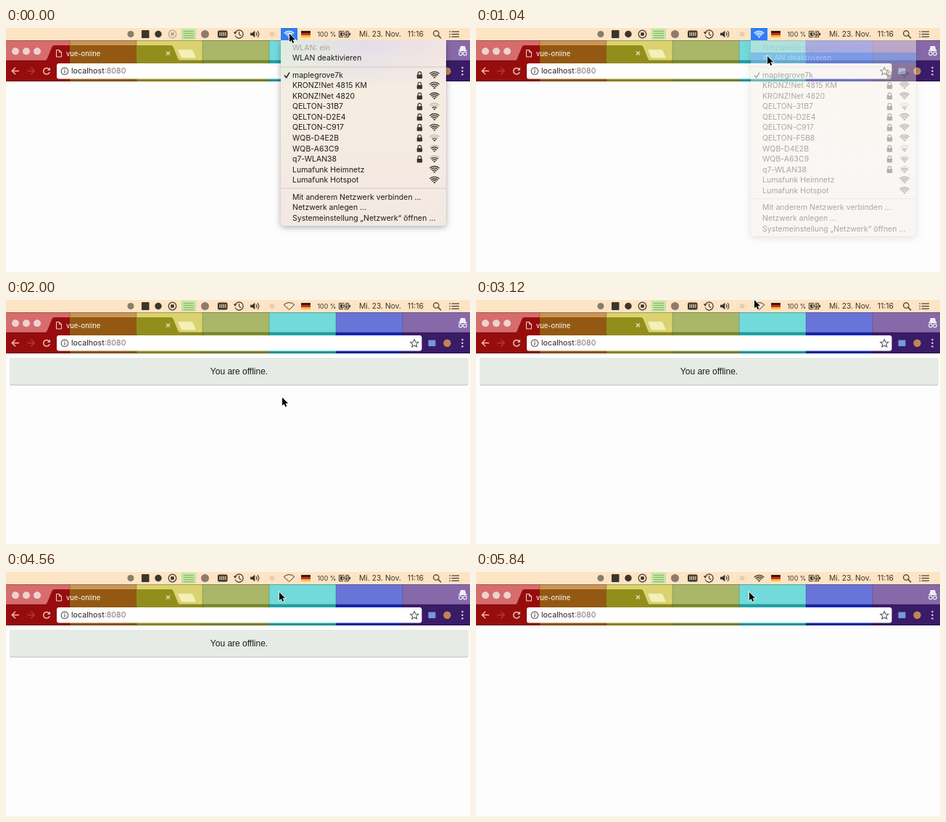
These frames come from a looping animation (640 by 338 pixels, 5.92 s). An HTML page with a canvas:

```html
<!DOCTYPE html>
<html lang="de">
<head>
<meta charset="utf-8">
<title>Online/offline demo</title>
<style>
html, body { margin: 0; width: 100%; height: 100%; overflow: hidden; background: #fdfdfd; }
canvas { display: block; width: 640px; height: 338px; }
</style>
</head>
<body>
<canvas id="stage"></canvas>
<script>
const LOOP = 5920, STEP = 80, W = 640, H = 338;
const canvas = document.getElementById('stage');
const c = canvas.getContext('2d');
const ratio = window.devicePixelRatio || 1;
canvas.width = W * ratio;
canvas.height = H * ratio;

const UI = 'Inter, sans-serif';
const INK = '#3d352d', BLUE = '#2f7df4';

// Stripe: left edge, tab strip colour, toolbar colour
const stripes = [
  [0, '#d66c6c', '#970d0d'], [88, '#c99457', '#935912'], [180, '#dbd270', '#938e1b'],
  [271, '#a8b768', '#7d8b2c'], [363, '#72dada', '#20a3a8'],
  [455, '#6974d9', '#1726ad'], [547, '#8769a9', '#3a1b67']
];

// Network: name, signal strength 1-3, locked
const networks = [
  ['maplegrove7k', 3, 1], ['KRONZ!Net 4815 KM', 3, 1], ['KRONZ!Net 4820', 3, 1],
  ['QELTON-31B7', 1, 1], ['QELTON-D2E4', 3, 1], ['QELTON-C917', 3, 1], ['QELTON-F5B8', 3, 1],
  ['WQB-D4E2B', 1, 1], ['WQB-A63C9', 2, 1], ['q7-WLAN38', 2, 1],
  ['Lumafunk Heimnetz', 3, 0], ['Lumafunk Hotspot', 3, 0]
];
const LATE_NETWORK = 6;

// Cursor keys: time, x, y
const cursorPath = [
  [0, 391, 8], [80, 391, 8], [560, 402, 39], [1360, 402, 39], [1840, 381, 135],
  [2640, 381, 135], [2800, 383, 149], [3120, 384, 0], [3200, 384, 0], [3440, 389, 7],
  [3840, 413, 37], [4240, 413, 37], [4480, 377, 28], [LOOP, 377, 28]
];

const clamp = v => Math.max(0, Math.min(1, v));
const smooth = p => p * p * (3 - 2 * p);

function rect(x, y, w, h, fill, radius = 0) {
  c.beginPath();
  c.roundRect(x, y, w, h, radius);
  c.fillStyle = fill;
  c.fill();
}

function circle(x, y, r, fill) {
  c.beginPath();
  c.arc(x, y, r, 0, 7);
  c.fillStyle = fill;
  c.fill();
}

function ring(x, y, r, color, width = 1, from = 0, to = Math.PI * 2) {
  c.beginPath();
  c.arc(x, y, r, from, to);
  c.strokeStyle = color;
  c.lineWidth = width;
  c.stroke();
}

function path(d, stroke, width = 1, fill) {
  const shape = new Path2D(d);
  if (fill) { c.fillStyle = fill; c.fill(shape); }
  if (stroke) { c.strokeStyle = stroke; c.lineWidth = width; c.stroke(shape); }
}

function text(str, x, baseline, size, color = '#1e1b18', family = UI, align = 'left') {
  c.font = `${size}px ${family}`;
  c.textAlign = align;
  c.fillStyle = color;
  c.fillText(str, x, baseline);
}

function wifi(x, apex, level, color) {
  const a = -Math.PI * 0.75, b = -Math.PI * 0.25;
  const base = c.globalAlpha;
  c.beginPath();
  c.moveTo(x, apex);
  c.arc(x, apex, 2.3, a, b);
  c.fillStyle = color;
  c.fill();
  [4.2, 6.8, 9.4].forEach((r, i) => {
    c.globalAlpha = base * (level > i ? 1 : 0.25);
    ring(x, apex, r, color, 1.4, a, b);
  });
  c.globalAlpha = base;
}

function wifiOutline(x, apex, color) {
  path(`M${x} ${apex}l-7.3 -6.8a10 10 0 0 1 14.6 0z`, color, 1);
}

function lock(x, y) {
  path(`M${x - 2.3} ${y}v-2a2.3 2.3 0 0 1 4.6 0v2`, INK, 1.2);
  rect(x - 3.7, y - 0.5, 7.4, 5.5, INK, 0.8);
}

function drawBrowser() {
  stripes.forEach(([x, strip, bar], i) => {
    const w = (stripes[i + 1] || [W])[0] - x;
    rect(x, 17, w, 28, strip);
    rect(x, 45, w, 29, bar);
    if (i) rect(x - 0.5, 17, 1, 57, 'rgba(0,0,0,.18)');
  });
  rect(0, 44.5, W, 1, 'rgba(0,0,0,.25)');
  rect(0, 73, W, 1, 'rgba(0,0,0,.25)');

  c.save();
  c.clip(new Path2D('M53 46Q56 45 57 42L63 27Q64 24 67 24H227Q230 24 231 27L237 42Q238 45 241 46Z'));
  stripes.slice(0, 3).forEach(([x, , bar]) => rect(x, 17, 92, 30, bar));
  c.restore();

  [13, 28, 43].forEach(x => circle(x, 32.2, 5, '#edd3d1'));
  path('M69.5 30.5h4l3 3v6.5h-7zM73.5 30.5v3h3', '#f3d8d5');
  text('vue-online', 83, 38.5, 9.4, '#fff');
  path('M221 32.5l5 5m0 -5l-5 5', '#e9e5c5', 1.1);
  path('M237 30h18q2 0 3 2l4 9.5h-18q-2 0 -3 -2z', null, 0, '#f3efb9');

  // Private window badge
  path('M624 31.5h12M626 30.5l1.5 -5h5l1.5 5z', '#f2eef6', 1.2, '#f2eef6');
  ring(627, 35.5, 2.3, '#f2eef6', 1.2);
  ring(633, 35.5, 2.3, '#f2eef6', 1.2);

  path('M18 59.5h-9.5m4.5 -4.7l-4.7 4.7l4.7 4.7', '#efc0bd', 1.4);
  path('M29.5 59.5h9.5m-4.5 -4.7l4.7 4.7l-4.7 4.7', '#ad3d38', 1.4);
  ring(56, 59.8, 4.3, '#efc0bd', 1.5, 0.3, 5.5);
  path('M61 54.5v4.2h-4.2z', null, 0, '#efc0bd');

  rect(70, 49, 503.5, 21.5, '#fff', 3);
  ring(81, 59.7, 4.8, '#555', 1.1);
  rect(80.4, 58.8, 1.2, 3.8, '#555');
  rect(80.4, 56.7, 1.2, 1.2, '#555');
  text('localhost', 90, 63.3, 10.7, '#222');
  text(':8080', 90 + c.measureText('localhost').width, 63.3, 10.7, '#777');
  path('M563.3 54.5l1.6 3.6l3.9 .4l-2.9 2.6l.8 3.9l-3.4 -2l-3.4 2l.8 -3.9l-2.9 -2.6l3.9 -.4z', '#555', 1.1);
  rect(582.5, 55.5, 10, 8.5, '#7897dc', 1);
  circle(608.5, 59.7, 5.2, '#bd8657');
  [55, 59.7, 64.4].forEach(y => circle(629.5, y, 1.2, '#e5dcef'));
}

function drawMenuBar(t, open, online) {
  rect(0, 0, W, 17, '#fce4c4');
  rect(0, 17, W, 1, 'rgba(70,45,25,.35)');

  circle(172, 8.5, 4.5, '#8b7d6d');
  rect(187, 3, 10.5, 11, INK, 1);
  circle(210, 8.5, 4.7, INK);
  const recording = t < 320 ? '#b9a893' : INK;
  ring(229.5, 8.5, 5.3, recording, 1.2);
  rect(227.2, 6.2, 4.6, 4.6, recording, 0.8);
  rect(242, 1, 20, 15, '#c5e4a0');
  for (let y = 4; y < 15; y += 3) rect(245, y, 14, 1, '#80b96d');
  circle(274.5, 8.5, 5.5, '#8a7b6b');
  rect(292, 3.5, 13.5, 10, INK, 2);
  for (let x = 294.5; x < 304; x += 2.6) rect(x, 5.8, 1.2, 5.2, '#fce4c4');
  ring(321.5, 8.5, 5.6, INK, 1.2, -2.6, 2.8);
  path('M321.5 5v3.7l2.7 2', INK, 1.1);
  path('M313.8 5.5h4.6l-2.4 3.5z', null, 0, INK);
  path('M337 6.7h2.7l3.6 -3v9.6l-3.6 -3H337z', null, 0, INK);
  [3, 5.8].forEach(r => ring(343, 8.5, r, INK, 1.1, -0.85, 0.85));
  circle(367, 8.5, 3.5, '#e6cfb3');

  if (open) rect(379, 0, 23, 17, BLUE);
  const color = open ? '#fff' : INK;
  if (online) {
    const searching = t >= 4720 && t < 5280;
    wifi(390.5, 13.8, searching ? 1 + Math.floor((t - 4720) / 160) % 3 : 3, color);
  } else {
    wifiOutline(390.5, 13.5, color);
  }

  ['#282320', '#d52b25', '#f3c32f'].forEach((fill, i) => rect(407, 4 + i * 3, 13, 3, fill));
  text('100 %', 429.5, 11.8, 8.9, INK);
  path('M459.5 4.5h13v8h-13z', INK, 1);
  rect(461, 6, 10, 5, INK);
  rect(473.3, 6.8, 1.8, 3.5, INK);
  path('M467.5 3l-4 6h3l-1.5 5l5 -6.5h-3z', '#fce4c4', 1, INK);
  text('Mi. 23. Nov.', 487, 12.2, 10.3, INK);
  text('11:16', 576, 12.2, 10.5, INK, UI, 'right');
  ring(593.3, 7.5, 3.7, INK, 1.2);
  path('M596 10.2l4 4', INK, 1.5);
  [4.5, 8, 11.5].forEach(y => {
    rect(611.5, y, 1.5, 1.2, INK);
    rect(614.5, y, 10.5, 1.2, INK);
  });
}

function menuPanel(bottom, tint, top, foot) {
  const shape = new Path2D();
  shape.roundRect(379, 17, 228, bottom - 17, [0, 0, 5, 5]);

  // Shadow falls outside the panel only, so a fading panel stays clean
  const outside = new Path2D(shape);
  outside.rect(0, 17, W, H);
  c.save();
  c.clip(outside, 'evenodd');
  c.shadowColor = 'rgba(0,0,0,.32)';
  c.shadowBlur = 8 * ratio;
  c.shadowOffsetY = 2 * ratio;
  c.fillStyle = top;
  c.fill(shape);
  c.restore();

  const body = c.createLinearGradient(0, 17, 0, bottom);
  body.addColorStop(0, top);
  body.addColorStop(1, foot);
  c.fillStyle = body;
  c.fill(shape);

  c.save();
  c.clip(shape);
  const glow = c.createLinearGradient(379, 0, 607, 0);
  glow.addColorStop(0, '#cfeade');
  glow.addColorStop(0.5, '#d8d2ee');
  glow.addColorStop(1, '#ecdde7');
  const alpha = c.globalAlpha;
  for (let y = 17; y < 77; y += 2) {
    c.globalAlpha = alpha * tint * (1 - (y - 17) / 75);
    rect(379, y, 228, 2, glow);
  }
  c.restore();
}

const separator = y => rect(379, y, 228, 1, 'rgba(90,75,65,.2)');
const item = (label, y, color) => text(label, 395, y + 3.7, 10.5, color);

function menuHead(title, action, hover) {
  item(title, 27, '#aaa39b');
  if (hover) rect(379, 34, 228, 14.3, BLUE);
  item(action, 41.5, hover ? '#fff' : undefined);
  separator(53.5);
}

function drawOnlineMenu(t) {
  const searched = t >= 400;
  const rows = networks.filter((_, i) => searched || i !== LATE_NETWORK);
  const shift = searched ? 14.6 : 0;
  menuPanel(274 + shift, 0.65, '#f6efe1', '#f3e8e3');
  menuHead(searched ? 'Netzwerke suchen …' : 'WLAN: ein', 'WLAN deaktivieren', t >= 480);
  path('M384 65.5l2.7 3.2l4.3 -7', '#222', 1.5);
  rows.forEach(([name, level, locked], i) => {
    const y = 65 + i * 14.55;
    item(name, y);
    if (locked) lock(570.5, y);
    wifi(591, y + 5, level, INK);
  });
  separator(221.5 + shift);
  ['Mit anderem Netzwerk verbinden …', 'Netzwerk anlegen …', 'Systemeinstellung „Netzwerk“ öffnen …']
    .forEach((label, i) => item(label, 234 + shift + i * 14.6));
}

function drawOfflineMenu(t) {
  menuPanel(76, 0.85, '#e3ebe4', '#e3ebe4');
  const hover = t >= 3680 && t < 4080 || t >= 4160;
  menuHead('WLAN: aus', 'WLAN aktivieren', hover);
  item('Systemeinstellung „Netzwerk“ öffnen …', 65);
}

function drawBanner() {
  rect(5, 80, 632.5, 38.5, '#c0cdc4', 2.5);
  rect(5, 80, 632.5, 37.3, '#e6ebe6', 2.5);
  text('You are offline.', 321.5, 102.5, 12, '#1b1b1b', '"Liberation Sans", sans-serif', 'center');
}

function drawCursor(t) {
  const i = cursorPath.findIndex(key => key[0] > t);
  const [t0, x0, y0] = cursorPath[i - 1], [t1, x1, y1] = cursorPath[i];
  const p = smooth((t - t0) / (t1 - t0));
  const arrow = 'M0 0v11.2l2.6 -2.3l1.8 4l1.9 -.8l-1.8 -3.9h3.6z';
  c.save();
  c.translate(x0 + (x1 - x0) * p, y0 + (y1 - y0) * p);
  path(arrow, '#fff', 1.4);
  path(arrow, null, 0, '#000');
  c.restore();
}

function draw(t) {
  c.setTransform(ratio, 0, 0, ratio, 0, 0);
  rect(0, 0, W, H, '#fdfdfd');
  drawBrowser();
  if (t >= 1520 && t < 5440) drawBanner();

  const first = t < 2000;
  const fadeStart = first ? 912 : 4180;
  const alpha = first || t >= 3440 ? clamp(1 - (t - fadeStart) / 200) : 0;
  drawMenuBar(t, alpha > 0, t < 1440 || t >= 4720);
  c.globalAlpha = alpha;
  if (alpha) (first ? drawOnlineMenu : drawOfflineMenu)(t);
  c.globalAlpha = 1;
  drawCursor(t);
}

const start = performance.now();
function tick() {
  const t = (performance.now() - start) % LOOP;
  draw(Math.floor(t / STEP) * STEP);
  requestAnimationFrame(tick);
}
tick();
</script>
</body>
</html>
```
